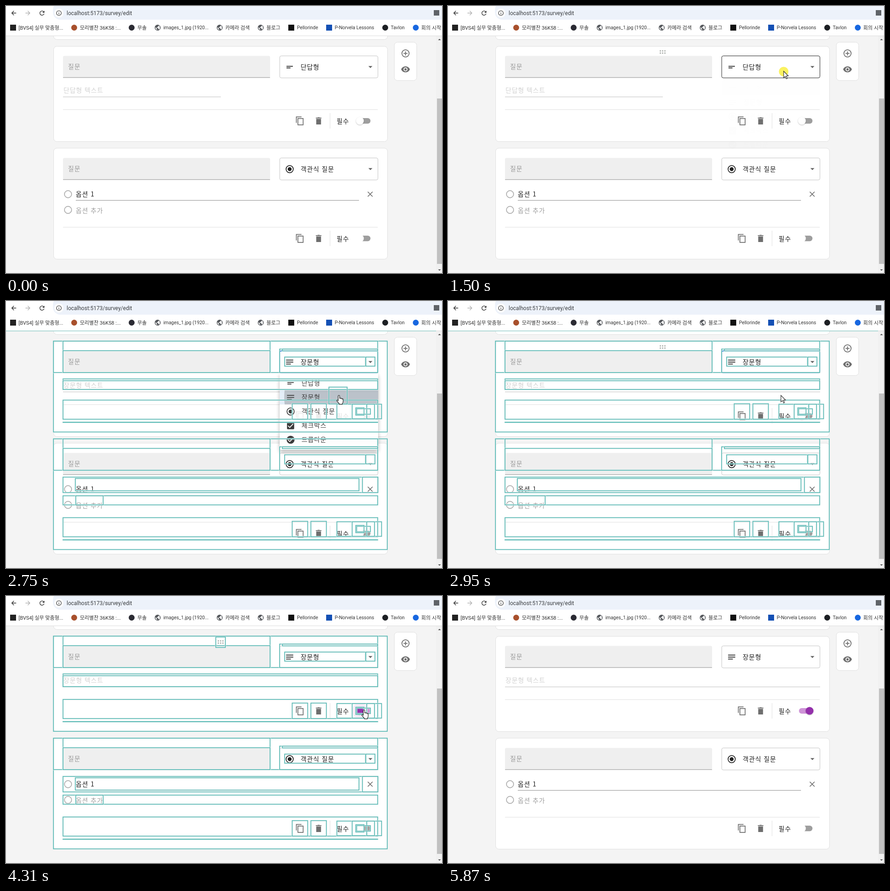
An HTML page that plays this animation: 956x586 px, repeating every 6950 ms.

```html
<!DOCTYPE html>
<html lang="ko">
<head>
<meta charset="utf-8">
<title>Survey editor</title>
<style>
html, body { margin: 0; width: 100%; height: 100%; overflow: hidden; background: #fff; }
svg { display: block; flex: none; }
text { font: 14px "Noto Sans CJK KR", "Noto Sans CJK", sans-serif; letter-spacing: .9px; }
#url { font: 12px Roboto, sans-serif; letter-spacing: 0; }
#marks { position: absolute; left: 8.5px; top: 30px; height: 34px; width: 948px; overflow: hidden;
  display: flex; align-items: center; gap: 17.5px; color: #333; white-space: pre; }
#marks div { display: flex; align-items: center; gap: 6px; flex: none;
  font: 11.1px Roboto, "Noto Sans CJK KR", "Noto Sans CJK", sans-serif; }
#marks .latin { font-size: 10.4px; }
#marks i { width: 13px; height: 13px; }
#knob { filter: drop-shadow(0 1px 1px rgba(0,0,0,.25)); }
.paper { filter: drop-shadow(0 4px 4px rgba(0,0,0,.34)); }
</style>
</head>
<body>
<svg id="stage" width="956" height="586"></svg>
<div id="marks"></div>
<script>
const LOOP = 6950;
const T = { enter: 260, press: 1500, open: 1570, settle: 1990, shown: 2180, pick: 2250, change: 2680,
  close: 2880, calm: 3150, toggle: 4170, flash: 4240, flip: 4310, flat: 4860, exit: 5870 };
const INK = '#212121', GREY = '#6e6e6e', LINE = '#e0e0e0', TEAL = '#45b5af';
const LEFT = 125, RIGHT = 815;
const FOOT = { copy: 644.5, trash: 685.5, rule: 710.5, knob: 776, track: 784 };

// Icons on a 24 unit grid
const line = (d, color = 'currentColor') => `<path d="${d}" fill="none" stroke="${color}" stroke-width="2"/>`;
const solid = d => `<path d="${d}" fill="currentColor"/>`;
const dot = (r, fill = 'currentColor') => `<circle cx="12" cy="12" r="${r}" fill="${fill}"/>`;
const hoop = '<circle cx="12" cy="12" r="9" fill="none" stroke="currentColor" stroke-width="2"/>';
const tick = line('M5.5 12.5l4.5 4 8.5-9', '#fff');
const ICONS = {
  back: line('M20 12H5M12.5 5l-7 7 7 7'),
  next: line('M4 12H19M11.5 5l7 7-7 7'),
  reload: line('M18 8.5A7 7 0 1 0 18.7 14') + solid('M13 11H20V4Z'),
  info: hoop + line('M12 11V17M12 7V9'),
  globe: dot(10) + '<path d="M4 10l5 5v2l2 2v1q-7-2-7-10zM16 4v2l-4 3v2H9v2h5l1 4 3 1q4-8-2-14z" fill="#fff"/>',
  short: line('M4 10H20M4 14H14'),
  long: line('M3 7H21M3 12H21M3 17H15'),
  radio: hoop + dot(5),
  check: '<rect x="3" y="3" width="18" height="18" rx="2" fill="currentColor"/>' + tick,
  drop: dot(10) + tick,
  copy: line('M3 17V2H16M7 6H20V22H7Z'),
  trash: solid('M6 7H18V21H6ZM5 4H9L10 3H14L15 4H19V6H5Z'),
  close: line('M6 6L18 18M18 6L6 18'),
  add: hoop + line('M12 7V17M7 12H17'),
  eye: solid('M1 12C5 2 19 2 23 12C19 22 5 22 1 12Z') + dot(5, '#fff') + dot(3),
  down: solid('M7 9.5l5 5 5-5z'),
  up: solid('M7 14.5l5-5 5 5z')
};
const icon = (name, x, y, color = INK, size = 21) =>
  `<g color="${color}" transform="translate(${x} ${y}) scale(${size / 24}) translate(-12 -12)">${ICONS[name]}</g>`;

// Markup helpers
const rect = (x, y, x2, y2, fill, more = '') =>
  `<rect x="${x}" y="${y}" width="${x2 - x}" height="${y2 - y}" fill="${fill}" ${more}/>`;
const disc = (x, y, r, fill, more = '') => `<circle cx="${x}" cy="${y}" r="${r}" fill="${fill}" ${more}/>`;
const text = (s, x, mid, fill = INK) => `<text x="${x}" y="${mid + 5.1}" fill="${fill}">${s}</text>`;
const group = (id, ...body) => `<g id="${id}">${body.join('')}</g>`;
const panel = (x, y, x2, y2) => rect(x, y, x2, y2, '#fff', `rx="7" stroke="${LINE}"`);
const hr = (y, color) => rect(LEFT, y, RIGHT, y + 1, color);

function toolbar() {
  return rect(0, 0, 956, 65, '#fff') + rect(103, -8, 980, 30, '#edf2fa', 'rx="16"') +
    icon('back', 17, 15.5, '#333', 16) + icon('next', 48, 15.5, '#b4b4b4', 16) + icon('reload', 79, 15.5, '#333', 16) +
    disc(116, 15.5, 10, '#fff') + icon('info', 116, 15.5, '#333', 14) +
    '<text id="url" x="133" y="19.7" fill="#3a3d40">localhost:5173/survey/edit</text>' +
    rect(938, 9, 950, 21, '#5f6368') + rect(0, 65, 956, 66, '#dcdcdc');
}

const bookmarks = [
  ['square', '#222', '[BVS4] 실무 맞춤형...'], ['round', '#a8502c', '모리별찬 36K58 :...'], ['round', '#2b2b33', '무솔'],
  ['globe', '#55585c', 'images_1.jpg (1920...'], ['globe', '#55585c', '카메라 검색'], ['globe', '#55585c', '블로그'],
  ['square', '#111', 'Pellorinde'], ['square', '#1450b4', 'P-Norvela Lessons'], ['round', '#1c1f23', 'Tavlon'],
  ['round', '#1767e0', '회의 시작 -']
];
const bookmark = ([kind, color, label]) => `<div class="${/[가-힣]/.test(label) ? '' : 'latin'}">` +
  (kind === 'globe' ? `<svg width="13" height="13" viewBox="2 2 20 20" color="${color}">${ICONS.globe}</svg>`
    : `<i style="background:${color};border-radius:${kind === 'round' ? 50 : 0}%"></i>`) + label + '</div>';

function handle(id, y) {
  const dots = [0, 1, 2, 3, 4, 5].map(i => disc(465.6 + i % 3 * 5, y + (i > 2 ? 4.6 : 0), 1.5, '#a6aaa6'));
  return group(id, ...dots);
}

function head(n, y) {
  return handle('handle' + n, y + 10.6) +
    rect(LEFT, y + 21.5, 579, y + 69, '#efefef', 'rx="3"') + rect(LEFT, y + 68.5, 579, y + 69.5, '#8c8c8c') +
    text('질문', 136, y + 44.5, '#9a9a9a') +
    rect(600.2, y + 21.5, 815.5, y + 69.8, '#fff', `rx="3.5" id="select${n}"`);
}

function foot(y, live) {
  const id = name => live ? `id="${name}"` : '';
  const mid = y + 25;
  return hr(y, LINE) + rect(FOOT.rule - .5, mid - 17, FOOT.rule + .5, mid + 17, LINE) +
    icon('copy', FOOT.copy, mid, GREY) + icon('trash', FOOT.trash, mid, GREY) + text('필수', 725, mid + 1) +
    rect(769.5, mid - 6, 799.2, mid + 6.2, '#9e9e9e', `rx="6.1" ${id('track')}`) +
    `<g ${id('thumb')}>` + (live ? disc(FOOT.knob, mid, 17, '#f3f3f3', 'id="halo"') : '') +
    disc(FOOT.knob, mid, 8.6, '#fff', id('knob')) + '</g>';
}

const answer = (kind, label, x2) => group(kind + 'Kind', icon(kind, 622, 134), text(label, 646, 133.5),
  text(label + ' 텍스트', 126, 185, '#d2d2d2'),
  `<path d="M${LEFT + .5} 199.5H${x2}" stroke="#808080" stroke-dasharray="1 1"/>`);
const ring = y => disc(136, y, 7.8, 'none', 'stroke="#a9a9a9" stroke-width="1.7"');

function page() {
  return rect(0, 66, 943, 586, '#f4f4f4') +
    panel(104.5, 40, 836.5, 73.5) + panel(104.5, 88.5, 836.5, 297.5) + panel(104.5, 312, 836.5, 555.5) +
    panel(851.5, 79.5, 900.5, 163.5) + icon('add', 876, 104, GREY) + icon('eye', 876, 139, GREY) +
    head(1, 88) + group('up', icon('up', 799, 134, '#666')) + group('down', icon('down', 799, 134, '#666')) +
    answer('short', '단답형', 471) + answer('long', '장문형', RIGHT + 1) + foot(227, true) +
    head(2, 312) + icon('radio', 622, 358) + text('객관식 질문', 646, 357.5) + icon('down', 799, 358, '#666') +
    ring(413) + text('옵션 1', 153, 412.5) + rect(153, 426, 774, 427, '#8c8c8c') + icon('close', 798.5, 413, GREY) +
    ring(447.5) + text('옵션 추가', 153, 448.5, '#9e9e9e') + foot(485) +
    group('scrollbar', rect(943, 66, 956, 586, '#f1f1f1'), rect(945, 203, 956, 566, '#c1c1c1'),
      icon('up', 950.5, 73.5, '#505050', 15), icon('down', 950.5, 579.5, '#505050', 15));
}

const ROW = 31, rowTop = i => 165 + ROW * i;
function menu() {
  const items = { short: '단답형', long: '장문형', radio: '객관식 질문', check: '체크박스', drop: '드롭다운' };
  return group('menu', rect(600, 159, 816, 327, '#fff', 'rx="3.5" class="paper"'),
    [0, 1].map(i => rect(600, rowTop(i), 816, rowTop(i + 1), '#fff', `id="row${i}"`)).join(''),
    `<clipPath id="clip">${rect(600, rowTop(1), 816, rowTop(2), INK)}</clipPath>`,
    `<g clip-path="url(#clip)">${disc(730, 211, 0, '#000', 'id="ripple" fill-opacity=".21"')}</g>`,
    ...Object.entries(items).map(([name, label], i) =>
      icon(name, 624, rowTop(i) + 15.5) + text(label, 648, rowTop(i) + 15.2)));
}

// Render highlights: a teal outline over a pale one
const box = (x, y, x2, y2) =>
  rect(x, y, x2, y2, 'none', 'stroke="#f0f0f0" stroke-opacity=".8" stroke-width="3.2"') +
  rect(x, y, x2, y2, 'none', `stroke="${TEAL}" stroke-width="1.6" stroke-opacity=".92"`);
const around = (x, y, rx, ry = rx) => box(x - rx, y - ry, x + rx, y + ry);
const bar = (y, y2) => box(LEFT, y, RIGHT, y2);

const selectBoxes = y => box(600, y + 17.5, RIGHT, y + 69) + box(606, y + 17.5, RIGHT, y + 21.5) +
  box(611, y + 35, 788, y + 55) + around(799, y + 45, 10);
const headBoxes = y => box(104, y, RIGHT, y + 69) + box(LEFT, y, 579, y + 69) +
  box(LEFT, y + 21, 579, y + 69) + selectBoxes(y);
function footBoxes(y) {
  const mid = y + 25;
  return bar(y, y + 42) + bar(y + 48.5, y + 49) + around(FOOT.copy, mid, 17) + around(FOOT.trash, mid, 17) +
    around(FOOT.rule, mid, 0, 17) + around(774.5, mid, 49, 16) + around(FOOT.knob - 1, mid, 16) +
    around(799.5, mid, 8.5, 16) + around(FOOT.track, mid, 15, 6) + around(FOOT.knob, mid, 9, 8);
}
// lift: how far the lower parts still sit above their final place
function flash(id, lift, ...extra) {
  const y = v => v - lift;
  return group(id, box(104, 88, 836, y(297)), headBoxes(88), bar(171, 199 - lift / 2), bar(175, 199 - lift / 2),
    footBoxes(y(227)), box(104, y(312), 836, y(555)), headBoxes(y(312)),
    bar(y(396), y(430)), box(152, y(399), 774, y(426)), around(798.5, y(413), 17),
    bar(y(437), y(457)), box(153, y(437), 213, y(457)), footBoxes(y(485)), ...extra);
}

const ARROW = 'M0 0V14.6L3.4 11.4L5.8 16.9L8 16L5.7 10.5H10.2Z';
const HAND = 'M4 12V2q0-1.7 1.6-1.7T7.2 2V7.5q.2-1.2 1.5-1.1t1.3 1.4q.3-1.1 1.5-.9t1.3 1.5q.4-.8 1.3-.5t.7 1.4V14q0 2.5-1.8 4.5V20H6.3v-1.4L1 12.6q-.6-1.3.4-1.8t1.8.2z';

document.getElementById('marks').innerHTML = bookmarks.map(bookmark).join('');
document.getElementById('stage').innerHTML = page() + menu() + toolbar() +
  group('openBoxes', selectBoxes(88), ...[0, 1, 2, 3, 4].map(i => box(600, rowTop(i), RIGHT, rowTop(i + 1)))) +
  group('menuBox', box(600, 159, 815.5, 326.5)) + rect(0, 65, 943, 66.4, TEAL, 'id="pageBox"') +
  flash('pickFlash', 9.5, group('rippleBox', around(728, 207.5, 20, 18.5))) +
  flash('toggleFlash', 0, around(470.5, 101.5, 10.5, 11.5)) +
  group('pointer', disc(0, 1, 10.5, '#f9f150', 'id="halation" fill-opacity=".9"'),
    `<path id="arrow" d="${ARROW}" fill="#fff" stroke="#222" stroke-width="1.1"/>`,
    `<path id="hand" d="${HAND}" transform="translate(-5.6 -.3)" fill="#fff" stroke="#222" stroke-width="1.2"/>`);

const parts = {};
document.querySelectorAll('#stage [id]').forEach(el => parts[el.id] = el);
const set = (id, attrs) => Object.entries(attrs).forEach(([k, v]) => parts[id].setAttribute(k, v));
const show = (id, amount) => set(id, { opacity: Number(amount) });
const move = (id, x, y) => set(id, { transform: `translate(${x} ${y})` });

// Pointer key points: time, x, y
const ROUTE = [[T.enter, 858, 538], [600, 780, 358], [920, 737, 164], [1010, 737, 160], [1340, 736, 143],
  [1640, 736, 143], [2040, 730, 207], [3350, 730, 207], [3710, 785, 250], [4930, 785, 250],
  [5300, 888, 478], [5520, 888, 478], [5860, 928, 586]];
const ramp = (t, a, b) => Math.min(1, Math.max(0, (t - a) / (b - a)));
function pointerAt(t) {
  const i = ROUTE.findIndex(p => p[0] > t);
  if (i < 1) return ROUTE[i ? ROUTE.length - 1 : 0].slice(1);
  const [a, b] = [ROUTE[i - 1], ROUTE[i]], k = ramp(t, a[0], b[0]);
  return [1, 2].map(j => a[j] + (b[j] - a[j]) * k);
}

function render(t) {
  const during = (a, b) => t >= a && t < b;
  const [x, y] = pointerAt(Math.floor((t - 50) / 70) * 70 + 50);
  const inside = during(T.enter, T.exit);
  const over = (x1, y1, x2, y2) => inside && x > x1 && x < x2 && y > y1 && y < y2;
  const modal = during(T.open, T.close), chosen = t >= T.change, on = t >= T.flip;
  const overSelect = top => over(600, top, RIGHT, top + 48);
  const overSwitch = over(759, 236, 802, 269), overRow = i => over(600, rowTop(i), RIGHT, rowTop(i + 1));

  // Pointer
  show('pointer', inside);
  move('pointer', x, y);
  const hand = modal ? y > 159 : overSwitch || overSelect(333);
  show('hand', hand);
  show('arrow', !hand);
  show('halation', [T.press, T.pick, T.toggle - 70].some(at => during(Math.max(at, at === T.press || at === T.pick ? at : T.toggle), at + 140)));

  // Cards and selects
  const focus = during(T.open, T.toggle);
  const border = hover => hover ? INK : '#c4c4c4';
  set('select1', { stroke: focus ? '#1976d2' : border(overSelect(110)), 'stroke-width': focus ? 1.8 : 1 });
  set('select2', { stroke: border(overSelect(333)) });
  show('handle1', !modal && over(104, 88, 836, 297));
  show('handle2', !modal && over(104, 312, 836, 555));
  show('up', during(T.open, T.change));
  show('down', !during(T.open, T.change));
  show('shortKind', !chosen);
  show('longKind', chosen);
  show('scrollbar', !during(T.open, T.change));

  // Menu
  show('menu', ramp(t, T.open - 70, T.open + 140) * (1 - ramp(t, T.change, T.close) ** 2));
  set('row0', { fill: chosen ? '#fff' : overRow(0) ? '#dfebf9' : '#edf4fc' });
  set('row1', { fill: chosen ? '#e1ecf7' : overRow(1) ? '#f4f4f4' : '#fff' });
  set('ripple', { r: 120 * ramp(t, T.pick - 70, T.change) });

  // Switch
  show('halo', overSwitch);
  set('halo', { fill: on ? '#f6eaf8' : '#f3f3f3' });
  set('knob', { fill: on ? '#9430ab' : '#fff' });
  set('track', { fill: t > T.flip ? '#ce93d7' : '#9e9e9e' });
  move('thumb', 16.8 * ramp(t, T.flip + 20, T.flip + 210), 0);

  // Highlights
  const opening = during(T.open, T.shown) ? 1 - ramp(t, T.settle, T.shown) : 0;
  show('openBoxes', during(T.open, T.settle));
  show('menuBox', opening);
  show('pageBox', during(T.change, T.calm + 200) ? .5 : opening * .8);
  show('pickFlash', during(T.change, T.calm));
  show('rippleBox', modal);
  show('toggleFlash', during(T.flash, T.flat));
}

const start = performance.now();
(function loop() {
  render((performance.now() - start) % LOOP);
  requestAnimationFrame(loop);
})();
</script>
</body>
</html>
```
